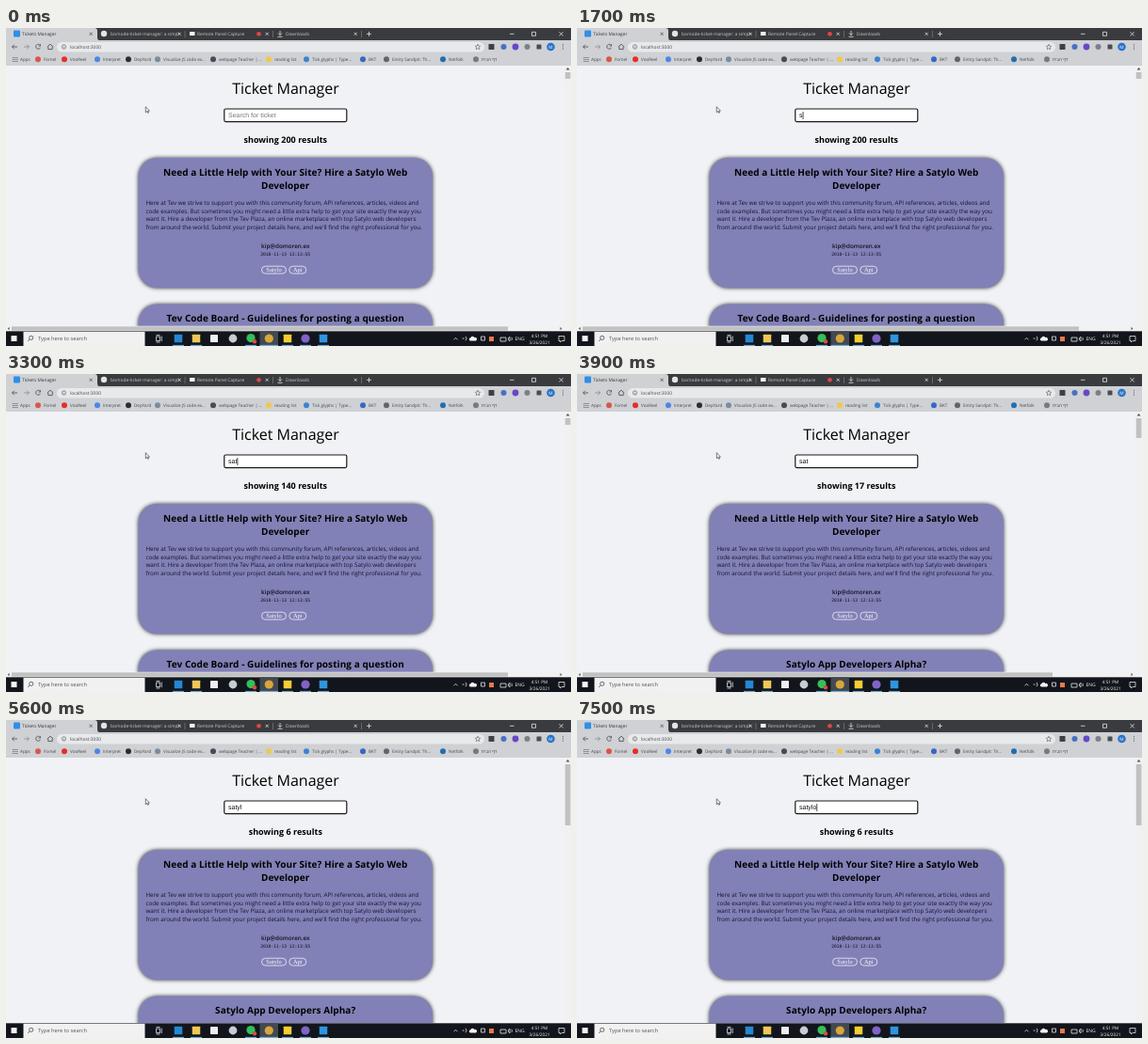
An HTML page for the animation above (7600 ms loop, 600 px wide and 338 px high).

```html
<!DOCTYPE html>
<html lang="en">
<head>
<meta charset="utf-8">
<title>Ticket Manager</title>
<style>
html, body { margin: 0; width: 100%; height: 100%; overflow: hidden; background: #f1f2f5; }
svg { display: block; width: 600px; height: 338px; font-family: "Open Sans", "Noto Sans", sans-serif; text-rendering: geometricPrecision; }
.mid { text-anchor: middle; }
.title { font-size: 16px; }
.count { font-size: 9px; font-weight: 700; letter-spacing: .03px; }
.head { font-size: 10px; font-weight: 700; letter-spacing: .06px; }
.body { font-size: 6.28px; fill: #14142c; }
.mail { font-size: 6.3px; font-weight: 600; fill: #111122; }
.date { font: 4.63px "DejaVu Sans Mono", monospace; fill: #0c0c1c; }
.tag { font: 6.4px "Liberation Serif", serif; fill: #fff; }
.pill { fill: none; stroke: #fff; stroke-width: .7; }
.field { font: 7px "Liberation Sans", sans-serif; }
.small { font-size: 4.6px; fill: #45484c; }
.tab { font-size: 4.8px; fill: #c9cbce; }
.tray { font-size: 4.7px; fill: #f2f2f2; }
.card { fill: #8181b7; filter: drop-shadow(0 0 2px #333); }
.line { fill: none; stroke: #55585c; stroke-width: .9; }
.pale { fill: none; stroke: #e4e6e8; stroke-width: .8; }
</style>
</head>
<body>
<svg viewBox="0 0 600 338">
  <defs>
    <clipPath id="view"><rect y="40" width="593" height="282"/></clipPath>
    <clipPath id="tabClip"><rect x="110" width="77" height="13"/></clipPath>
  </defs>

  <rect width="600" height="338" fill="#f1f2f5"/>

  <g clip-path="url(#view)">
    <text class="mid title" x="297" y="69.6">Ticket Manager</text>
    <rect x="231.8" y="86" width="130" height="13.6" rx="1.5" fill="#fff" stroke="#181818" stroke-width="1.2"/>
    <text class="field" id="query" x="236" y="95.3"></text>
    <rect id="caret" y="89" width=".7" height="8"/>
    <text class="mid count" id="count" x="296.8" y="122"></text>

    <rect class="card" x="140.5" y="138" width="312.5" height="138.3" rx="20"/>
    <text class="mid head" x="296.7" y="157">Need a Little Help with Your Site? Hire a Satylo Web</text>
    <text class="mid head" x="296.7" y="170.5">Developer</text>
    <g class="body">
      <text x="148.5" y="187.9">Here at Tev we strive to support you with this community forum, API references, articles, videos and</text>
      <text x="148.5" y="196.7">code examples. But sometimes you might need a little extra help to get your site exactly the way you</text>
      <text x="148.5" y="205.4">want it. Hire a developer from the Tev Plaza, an online marketplace with top Satylo web developers</text>
      <text x="148.5" y="214.1">from around the world. Submit your project details here, and we'll find the right professional for you.</text>
    </g>
    <text class="mid mail" x="296.8" y="233.7">kip@domoren.ex</text>
    <text class="mid date" x="296.7" y="242.3">2018-11-13 12:13:55</text>
    <rect class="pill" x="271.5" y="253.2" width="26" height="7.8" rx="3.9"/>
    <rect class="pill" x="300.8" y="253.2" width="18" height="7.8" rx="3.9"/>
    <text class="mid tag" x="284.5" y="259.2">Satylo</text>
    <text class="mid tag" x="309.8" y="259.2">Api</text>

    <rect class="card" x="140.5" y="293.5" width="312.5" height="138" rx="20"/>
    <text class="mid head" id="second" x="296.7" y="312.4"></text>
  </g>

  <!-- scrollbars -->
  <rect x="593" y="40" width="7" height="282" fill="#f1f1f1"/>
  <path d="M594.6 44.4l2-2.3 2 2.3z" fill="#505050"/>
  <rect id="vThumb" x="593.8" y="47" width="5.6" fill="#c1c1c1"/>
  <g id="hBar">
    <rect y="316.7" width="600" height="5.6" fill="#f1f1f1"/>
    <rect id="hThumb" x="6" y="317.3" height="4.4" fill="#c1c1c1"/>
    <path d="M3.6 317.8l-2 1.7 2 1.7zM588.5 317.8l2 1.7-2 1.7z" fill="#606060"/>
  </g>

  <!-- browser frame -->
  <rect width="600" height="14" fill="#393b3f"/>
  <rect y="13" width="600" height="27" fill="#cfd1d4"/>
  <path d="M0 13.5V0H94q3 0 3 3v7q0 3 3 3.5z" fill="#cfd1d4"/>
  <rect x="8" y="2.5" width="7" height="7" rx="1" fill="#2f8fe8"/>
  <text class="tab" x="17" y="8" style="fill:#33363a">Tickets Manager</text>
  <circle cx="104" cy="6" r="3.2" fill="#e2e3e5"/>
  <text class="tab" x="111" y="8" clip-path="url(#tabClip)">bo/node-ticket-manager: a simpl</text>
  <rect x="195" y="4" width="5.5" height="4" fill="#f4f4f4"/>
  <text class="tab" x="203" y="8">Remote Panel Capture</text>
  <circle cx="268.5" cy="6.3" r="2.4" fill="#d9484a"/>
  <path class="pale" d="M291 3v4.5m-2-2l2 2 2-2M288.5 9.3h5"/>
  <text class="tab" x="297" y="8">Downloads</text>
  <path class="line" d="M88.7 4.8l3 3m0-3l-3 3"/>
  <path class="pale" d="M182.7 4.8l3 3m0-3l-3 3M275.7 4.8l3 3m0-3l-3 3M369.7 4.8l3 3m0-3l-3 3M383 6.3h5m-2.5-2.5v5M535 6.3h4.5M558.5 4.3h4v4h-4zM587.5 4.2l4.2 4.2m0-4.2l-4.2 4.2"/>
  <path d="M190 3v7M283.5 3v7M377.5 3v7" stroke="#85888c" stroke-width=".6"/>

  <path class="line" d="M12 20H6.5m2.3-2.3L6.5 20l2.3 2.3"/>
  <path class="line" d="M19 20h5.5m-2.3-2.3l2.3 2.3-2.3 2.3" opacity=".5"/>
  <path class="line" d="M36.4 18.6a2.5 2.5 0 1 0 .1 2.2m0-3.6v1.9h-1.9M43.8 20l3.2-2.8 3.2 2.8M44.8 19.6v3h4.4v-3"/>
  <rect x="54" y="15" width="454" height="10.5" rx="5.2" fill="#e8e9eb"/>
  <circle class="line" cx="61.5" cy="20" r="2.2" style="stroke-width:.6"/>
  <path d="M61.5 19.8v1.6M61.5 18.5v.6" stroke="#55585c" stroke-width=".6"/>
  <text class="small" x="68" y="21.8" style="font-size:4.9px">localhost:3000</text>
  <path class="line" style="stroke-width:.6" d="M501 17.2l.8 1.9 2 .2-1.5 1.4.4 2-1.7-1-1.7 1 .4-2-1.5-1.4 2-.2z"/>
  <g id="extras"></g>
  <text class="mid" x="578.5" y="21.8" font-size="4.8" fill="#fff">M</text>
  <path d="M591.5 17.3v.9m0 1.3v.9m0 1.3v.9" stroke="#45484c" stroke-width="1"/>
  <g id="marks"></g>
  <path d="M7 31.5h5.5m-5.5 2h5.5m-5.5 2h5.5" stroke="#5f6368" stroke-width="1.2" stroke-dasharray="1.2 .9"/>

  <path d="M148.3 83.7v6l1.4-1.2.9 1.9.9-.4-.9-1.9h1.8z" fill="#fff" stroke="#222" stroke-width=".6"/>

  <!-- taskbar -->
  <rect y="322.3" width="600" height="15.7" fill="#12161c"/>
  <rect x="5.5" y="327" width="6" height="6" fill="#f4f4f4"/>
  <rect x="18.5" y="322.8" width="129" height="15.2" fill="#f1f1f1"/>
  <circle class="line" cx="26.7" cy="329.3" r="2.1"/>
  <path class="line" d="M25.2 330.9l-2 2"/>
  <text x="34" y="332.3" font-size="5.7" fill="#555">Type here to search</text>
  <path class="pale" d="M159.5 328h4v4.5h-4zM165.3 327.5v5.5M159.5 326.4h4M159.5 334h4"/>
  <rect x="269.5" y="322.3" width="19.5" height="15.7" fill="#434950"/>
  <g id="apps"></g>
  <circle cx="264" cy="333.2" r="2.2" fill="#df4b45"/>
  <path d="M177 337.4h12m7 0h12m46 0h12m3.5 0h19.5m4 0h12m7 0h12m7 0h12" stroke="#76b9ed" stroke-width="1"/>
  <path class="pale" d="M475.5 331.3l2-2 2 2M484.6 330h2m1.5-2.2q2 2.2 0 4.4M504.5 328h4v4h-4zM525 329h6v4h-6zM533.5 329.5l1.5-1.3v4.6l-1.5-1.3zM536.8 328.8q1.3 1.6 0 3.2"/>
  <path d="M493 332.5a1.7 1.7 0 0 1 .3-3.3 2.2 2.2 0 0 1 4-.2 1.8 1.8 0 0 1 1.6 3.5z" fill="#f2f2f2"/>
  <rect x="513" y="328" width="5" height="5" fill="#e87a4a"/>
  <text class="tray" x="540.5" y="332" style="font-size:5px">ENG</text>
  <text class="mid tray" x="566.5" y="328.7">4:51 PM</text>
  <text class="mid tray" x="566.5" y="336">3/26/2021</text>
  <path class="pale" d="M587 327.5h6v5h-3l-1.5 1.5v-1.5H587z"/>
</svg>

<script>
const byId = id => document.getElementById(id);

function add(parent, name, attrs, text = "") {
  const node = document.createElementNS("http://www.w3.org/2000/svg", name);
  for (const key in attrs) node.setAttribute(key, attrs[key]);
  node.textContent = text;
  byId(parent).append(node);
}
const dot = (parent, cx, cy, r, fill) => add(parent, "circle", { cx, cy, r, fill });
const box = (parent, cx, cy, size, fill) =>
  add(parent, "rect", { x: cx - size / 2, y: cy - size / 2, width: size, height: size, rx: .6, fill });

const bookmarks = [
  [9, "", "Apps"], [34, "#d9564b", "Fomel"], [62, "#e62d2a", "VooReel"],
  [97, "#4a87e8", "Interpret"], [130, "#2b2d30", "DepYard"],
  [161, "#7b8ca0", "Visualize JS code ex..."], [220, "#454c55", "webpage Teacher | ..."],
  [279, "#f1c84c", "reading list"], [319, "#3b82d5", "Tick glyphs | Type..."],
  [379, "#3567c5", "BKT"], [404, "#60656b", "Entity Sandpit: Th..."],
  [464, "#1f6fb0", "Netfolk"], [499, "#777b80", "דף הבית"]
];
for (const [x, color, label] of bookmarks) {
  if (color) dot("marks", x, 33.2, 3, color);
  add("marks", "text", { class: "small", x: x + 6, y: 34.9 }, label);
}

box("extras", 515.5, 20, 6, "#3b4147");
dot("extras", 528.5, 20, 3, "#496fc2");
dot("extras", 541, 20, 3.4, "#6747c7");
dot("extras", 553.5, 20, 3, "#7a8188");
box("extras", 566, 20, 5, "#4a4d51");
dot("extras", 578.5, 20, 4.3, "#2872c8");

box("apps", 183, 330, 8.5, "#2587d2");
box("apps", 202, 330, 8.5, "#f0c757");
box("apps", 221, 330, 8, "#eceef0");
dot("apps", 241, 330, 4.4, "#c8cdd2");
dot("apps", 260, 329.6, 4.6, "#35bf58");
dot("apps", 279.3, 330, 4.6, "#d7a63c");
box("apps", 299, 330, 8.5, "#f6cd32");
dot("apps", 318, 330, 4.6, "#8063c4");
box("apps", 337, 330, 8.5, "#2f95df");

const LOOP = 7600, BLINK = 500;
const WORD = "satylo";
const keys = [1500, 2300, 3300, 4200, 5000, 6300];
const guide = "Tev Code Board - Guidelines for posting a question";
const alpha = "Satylo App Developers Alpha?";
const pages = [
  { at: 0, count: 200, second: guide, v: 7, h: 527 },
  { at: 2400, count: 140, second: guide, v: 7, h: 527 },
  { at: 3500, count: 17, second: alpha, v: 21, h: 499 },
  { at: 4400, count: 6, second: alpha, v: 65, h: 0 }
];
const query = byId("query"), caret = byId("caret");
let lastPage, lastTyped;

function showPage(page) {
  byId("count").textContent = `showing ${page.count} results`;
  byId("second").textContent = page.second;
  byId("vThumb").setAttribute("height", page.v);
  byId("hThumb").setAttribute("width", page.h);
  byId("hBar").style.display = page.h ? "" : "none";
}

function showQuery(typed) {
  query.textContent = WORD.slice(0, typed) || "Search for ticket";
  query.setAttribute("fill", typed ? "#111" : "#757575");
  caret.setAttribute("x", 236.2 + (typed ? query.getComputedTextLength() : 0));
}

function draw(now) {
  const t = now % LOOP;
  const page = pages.filter(p => p.at <= t).pop();
  const typed = keys.filter(k => k <= t).length;
  if (page !== lastPage) showPage(lastPage = page);
  if (typed !== lastTyped) showQuery(lastTyped = typed);
  const since = typed ? t - keys[typed - 1] : t + BLINK;
  caret.style.display = Math.floor(since / BLINK) % 2 ? "none" : "";
}

const start = performance.now();
function tick() {
  draw(performance.now() - start);
  requestAnimationFrame(tick);
}
tick();
</script>
</body>
</html>
```
